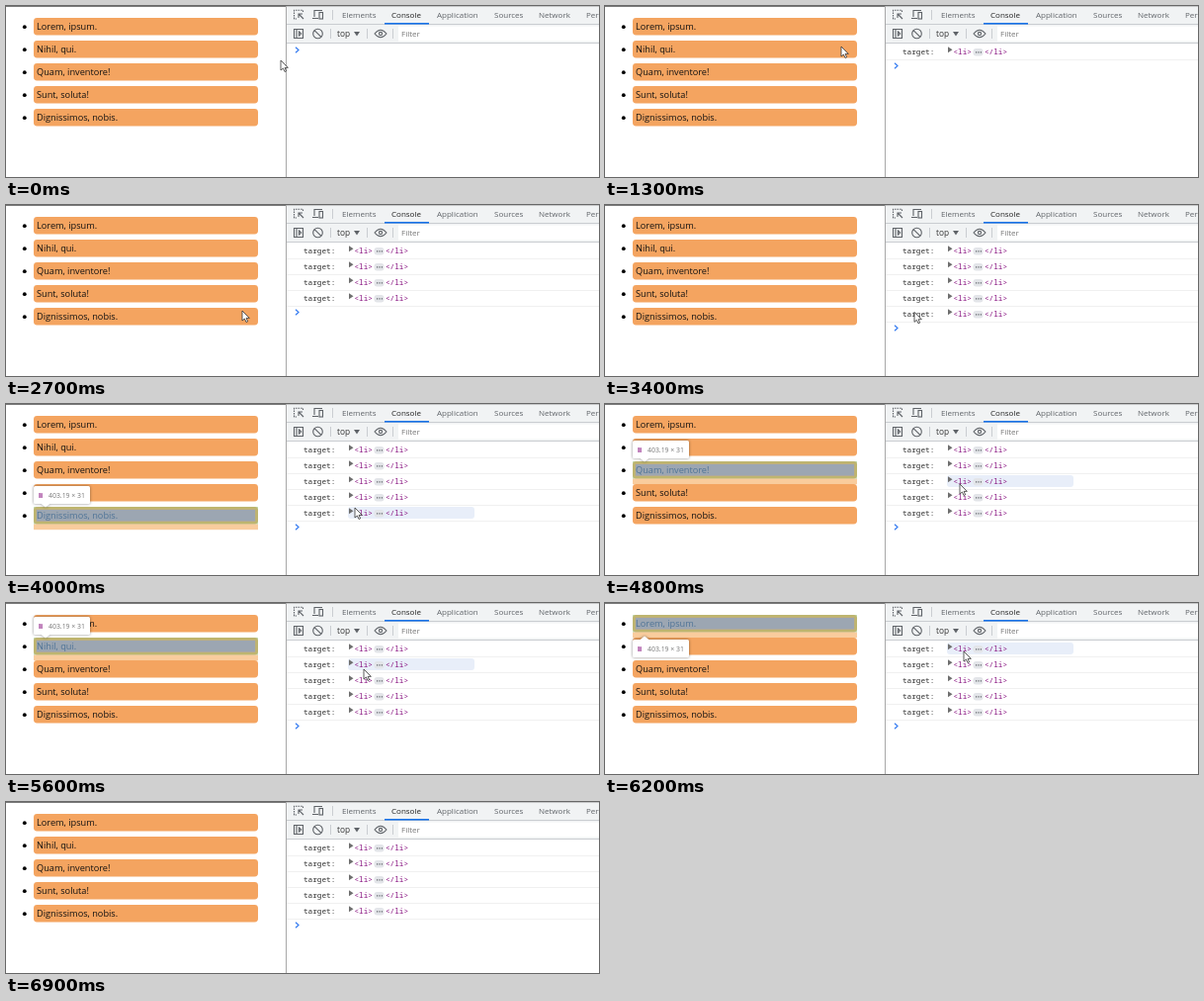
These frames come from a looping animation (600 px wide and 173 px high, 7.4 s). An HTML page:

```html
<!DOCTYPE html>
<html>
<head>
<meta charset="utf-8">
<style>
html, body { margin: 0; width: 100%; height: 100%; overflow: hidden; background: #fff; }
svg { display: block; width: 600px; height: 173px; }
text { white-space: pre; }
.item { font: 9.2px "Open Sans", sans-serif; fill: #111; }
.ui { font: 8px "Open Sans", sans-serif; fill: #5f6368; }
.log { font: 7.7px "Noto Sans Mono", monospace; fill: #303030; }
.tag { fill: #881280; }
.tip { font: 6.9px "Open Sans", sans-serif; fill: #777; }
.icon { fill: none; stroke: #5f6368; stroke-width: 1.1; }
.sep { stroke: #cacdd1; stroke-width: 1; }
</style>
</head>
<body>
<svg viewBox="0 0 600 173">
  <rect width="600" height="173" fill="#fff"/>
  <g id="list"></g>

  <rect x="284" width="316" height="38" fill="#f1f3f4"/>
  <rect x="397" y="20.5" width="204" height="15" fill="#fff"/>
  <path class="sep" d="M284 18.5H600M284 37.5H600M330.5 4V14M328.5 23V33M365.5 23V33M391.5 23V33"/>
  <rect x="383" y="17" width="45" height="1.6" fill="#1a73e8"/>
  <g id="tabs"></g>
  <g class="icon">
    <path d="M300.500 6V4.200H291.500V13H294" stroke-dasharray="1.600 1"/>
    <path d="M296 8L301 13M296 12V8H300"/>
    <path d="M312 11V4.500H320M310 12.500H316"/>
    <rect x="317" y="6.500" width="3.500" height="6.500"/>
    <path d="M291.500 23.500H300.500V32.500H291.500ZM294 23.500V32.500M296.500 26L298.700 28L296.500 30Z"/>
    <circle cx="315.500" cy="28" r="4.800"/>
    <path d="M312 24.600L319 31.400"/>
    <path d="M373 28Q379 20.500 385 28Q379 35.500 373 28Z"/>
    <circle cx="379" cy="28" r="1.600"/>
  </g>
  <path d="M352 26H358L355 30.500Z" fill="#5f6368"/>
  <text class="ui" x="335" y="31" style="fill:#333;font-size:8.300px">top</text>
  <text class="ui" x="400" y="31" style="fill:#757575">Filter</text>

  <rect id="hover" x="346" width="128" height="12" rx="3" fill="#e8eef9"/>
  <g id="logs"></g>
  <path id="prompt" d="M293 41.800L296 44.500L293 47.200" fill="none" stroke="#367cf1" stroke-width="1.200"/>

  <path d="M283.500 0V173" stroke="#a8a8a8"/>
  <path d="M0 .3H283" stroke="#333" stroke-width=".8"/>
  <path d="M284 .3H600" stroke="#999" stroke-width=".6"/>

  <g id="box">
    <rect x="28" y="17.500" width="227" height="5.700" fill="rgba(246,178,107,.66)"/>
    <path d="M28 0H255V17.500H28ZM30.800 2.800V14.700H252.200V2.800Z" fill="rgba(147,196,125,.55)"/>
    <rect x="30.800" y="2.800" width="221.400" height="11.900" fill="rgba(111,168,220,.66)"/>
  </g>
  <g id="tip" style="filter:drop-shadow(0 .5px 1.500px rgba(0,0,0,.45))">
    <rect x="28" width="57" height="18" rx="1.500" fill="#fff"/>
    <path id="arrow" fill="#fff"/>
    <text class="tip" x="33" y="11.500" style="fill:#881280;font-weight:bold">li</text>
    <text class="tip" x="43" y="11.500">403.19 × 31</text>
  </g>
  <path id="cursor" d="M0 0V10L2.400 8L4 11.500L5.600 10.800L4.100 7.400H7.300Z" fill="#fff" stroke="#333" stroke-width=".8"/>
</svg>
<script>
const $ = id => document.getElementById(id);
const move = (el, y, x = 0) => el.setAttribute('transform', `translate(${x} ${y})`);
const show = (el, on) => el.style.display = on ? '' : 'none';

$('list').innerHTML = ['Lorem, ipsum.', 'Nihil, qui.', 'Quam, inventore!', 'Sunt, soluta!', 'Dignissimos, nobis.']
  .map((s, i) => `<g transform="translate(0 ${23 * i})">
    <circle cx="18.8" cy="21.2" r="1.9"/>
    <rect x="28" y="12" width="227" height="17.5" rx="3.4" fill="#f4a460"/>
    <text class="item" x="31" y="24">${s}</text></g>`).join('');

$('tabs').innerHTML = [[340, 'Elements'], [390, 'Console'], [436, 'Application'], [494, 'Sources'], [539, 'Network'], [587, 'Performance']]
  .map(([x, s]) => `<text class="ui" x="${x}" y="11.5"${s == 'Console' ? ' style="fill:#222"' : ''}>${s}</text>`).join('');

$('logs').innerHTML = [0, 1, 2, 3, 4].map(i => `<g transform="translate(0 ${16 * i})">
  <path d="M284 54.500H600" stroke="#f0f0f0"/>
  <text class="log" x="301" y="49">target:</text>
  <path d="M347 41.300L351.500 44.300L347 47.300Z" fill="#6e6e6e"/>
  <text class="log tag" x="352.500" y="49">&lt;li&gt;</text>
  <rect x="372.500" y="43" width="10" height="7.500" rx="3" fill="#e3e5e9"/>
  <path d="M375 46.800H381" stroke="#5f6368" stroke-width="1.200" stroke-dasharray="1.200"/>
  <text class="log tag" x="384" y="49">&lt;/li&gt;</text></g>`).join('');
const logs = [...$('logs').children];

const clicks = [700, 1400, 1900, 2400, 3100];
// time, x, y of the pointer tip
const path = [
  [0, 278, 55], [400, 241, 22], [700, 241, 22], [1300, 239, 41], [1400, 238, 47],
  [1700, 235, 67], [1900, 235, 67], [2300, 238, 86], [2400, 238, 86], [2700, 239, 107],
  [3000, 239, 107], [3600, 350, 109], [3800, 350, 109], [4000, 353, 105], [4300, 357, 97],
  [4500, 357, 97], [4800, 359, 81], [5000, 360, 79], [5100, 360, 79], [5600, 362, 67],
  [5700, 362, 67], [6200, 363, 49], [6400, 363, 49], [6800, 557, 111]
];

function pointer(t) {
  const k = path.findIndex(p => p[0] > t);
  if (k < 0) return path[path.length - 1].slice(1);
  const [a, b] = [path[k - 1], path[k]], f = (t - a[0]) / (b[0] - a[0]);
  return [a[1] + (b[1] - a[1]) * f, a[2] + (b[2] - a[2]) * f];
}

function draw(now) {
  const t = Math.floor(now % 7400 / 100) * 100;
  const [x, y] = pointer(t), visible = t < 6900;
  const count = clicks.filter(c => c <= t).length;
  logs.forEach((g, i) => show(g, i < count));
  move($('prompt'), 16 * count);
  show($('cursor'), visible);
  move($('cursor'), y, x);

  const row = Math.floor((y - 40) / 16), dy = y - 40 - 16 * row;
  const over = visible && x > 346 && x < 474 && row >= 0 && row < count && dy <= 13;
  for (const id of ['hover', 'box', 'tip']) show($(id), over);
  if (over) {
    const top = 12 + 23 * row;
    $('hover').setAttribute('y', 40 + 16 * row);
    move($('box'), top);
    move($('tip'), row ? top - 21 : 37);
    $('arrow').setAttribute('d', row ? 'M35.500 18H44.500L40 21.500Z' : 'M35.500 0H44.500L40 -3.500Z');
  }
  requestAnimationFrame(draw);
}
draw(0);
</script>
</body>
</html>
```
